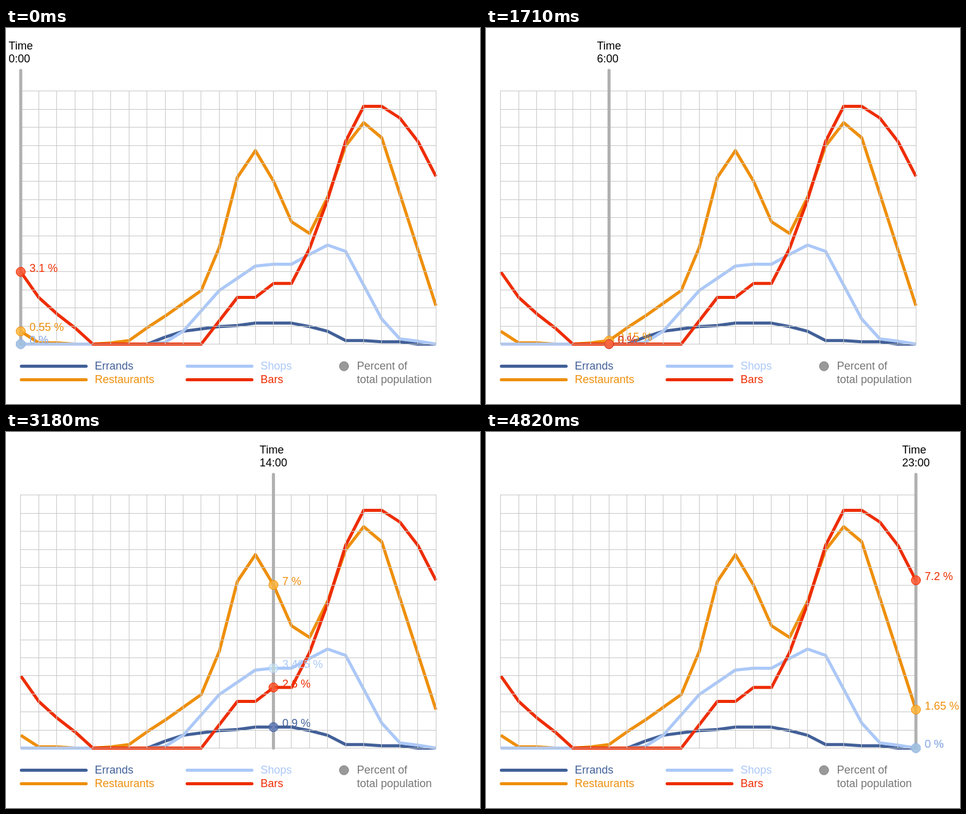
Recreate the animation shown at these times as an HTML page with a canvas. Size 772x612 px, loop 5.43 s.

```html
<!DOCTYPE html>
<html lang="en">
<head>
<meta charset="utf-8">
<title>Activity by hour</title>
<style>
html, body { margin: 0; height: 100%; overflow: hidden; background: #fff; }
canvas { display: block; }
</style>
</head>
<body>
<canvas id="stage" width="772" height="612"></canvas>
<script>
const ctx = document.getElementById('stage').getContext('2d');
const LOOP = 5430, LEFT = 24, STEP = 29.4, BASE = 514.5, UNIT = 37.94;
const GRID = '#c8c8c8';

// Each key is [hour, percent, bend]; the hours between follow t^bend (1 = straight).
// Values are rounded to the given precision.
const series = [
  { name: 'Errands', color: '#426098', fill: '#5a74b4', alpha: .8, legend: [25, 550.5], precision: .05,
    keys: [[7, 0], [9, .55], [13, .9], [15, .9], [17, .55], [18, .15], [21, .1], [22, 0]] },
  { name: 'Restaurants', color: '#ee8f0c', fill: '#ffb02c', alpha: .8, legend: [25, 572.5], precision: .05,
    keys: [[0, .55], [1, .05], [4, 0], [6, .15], [10, 2.3], [12, 7.15, 1.4], [13, 8.3], [14, 7],
      [16, 4.75, .36], [18, 8.5, 1.27], [19, 9.5], [20, 8.85], [23, 1.65]] },
  { name: 'Shops', color: '#abc8f8', fill: '#cdf0fc', alpha: .55, legend: [295, 550.5], precision: .025,
    keys: [[7, 0], [9, .55, 2.9], [11, 2.3], [13, 3.35], [14, 3.425], [15, 3.425], [17, 4.25],
      [18, 3.975], [20, 1.075], [21, .225], [23, 0]] },
  { name: 'Bars', color: '#ee2d00', fill: '#ff4b20', alpha: .8, legend: [295, 572.5], precision: .1,
    keys: [[0, 3.1], [1, 2], [4, 0], [10, 0], [12, 2], [13, 2], [14, 2.6], [15, 2.6],
      [18, 8.7, 1.3], [19, 10.2], [20, 10.2], [23, 7.2, 1.67]] }
];

function valueAt({ keys, precision }, hour) {
  const next = keys.findIndex(key => key[0] >= hour);
  if (next < 0) return keys[keys.length - 1][1];
  const [h1, v1, bend = 1] = keys[next];
  if (next === 0 || h1 === hour) return v1;
  const [h0, v0] = keys[next - 1];
  const value = v0 + (v1 - v0) * ((hour - h0) / (h1 - h0)) ** bend;
  return +(Math.round(value / precision) * precision).toFixed(3);
}

// Milliseconds from one hour to the next: quick at first, then a repeating rhythm
function gapBefore(hour) {
  if (hour === 1) return 910;
  if (hour < 12) return 157;
  if (hour < 14) return 230;
  return [170, 150, 230][hour % 3];
}

function hourAt(time) {
  let hour = 0;
  for (let start = 0; hour < 23; hour++) {
    start += gapBefore(hour + 1);
    if (start > time) break;
  }
  return hour;
}

const px = hour => LEFT + STEP * hour;
const py = value => BASE - UNIT * value;

function line(points, color, width, cap = 'butt') {
  ctx.beginPath();
  points.forEach(([x, y]) => ctx.lineTo(x, y));
  ctx.strokeStyle = color;
  ctx.lineWidth = width;
  ctx.lineCap = cap;
  ctx.stroke();
}

function dot(x, y, fill, edge, alpha = 1) {
  ctx.beginPath();
  ctx.arc(x, y, 7.5, 0, Math.PI * 2);
  ctx.globalAlpha = alpha;
  ctx.fillStyle = fill;
  ctx.fill();
  ctx.globalAlpha = 1;
  ctx.strokeStyle = edge;
  ctx.lineWidth = 1;
  ctx.stroke();
}

function text(str, x, y, color) {
  ctx.fillStyle = color;
  ctx.fillText(str, x, y);
}

function drawGrid() {
  for (let i = 0; i < 24; i++) {
    const x = Math.floor(23.85 + STEP * i) + .5;
    line([[x, 102], [x, 515]], GRID, 1);
  }
  for (let i = 0; i < 15; i++) {
    const y = Math.floor(102.9 + STEP * i) + .5;
    line([[23, y], [701, y]], GRID, 1);
  }
}

function drawLegend() {
  for (const { name, color, legend: [x, y] } of series) {
    line([[x, y], [x + 105.5, y]], color, 5, 'round');
    text(name, x + 119.5, y + 5.9, color);
  }
  dot(550.5, 550.5, '#999', '#808080');
  text('Percent of', 571.5, 556.4, '#757575');
  text('total population', 571.5, 577.5, '#757575');
}

function drawMarker(hour) {
  const x = px(hour), clock = hour + ':00';
  line([[x, 69], [x, BASE]], '#b0b0b0', 5, 'round');
  for (const s of series) {
    const value = valueAt(s, hour), y = py(value);
    dot(x, y, s.fill, s.color, s.alpha);
    text(value + ' %', x + 14.3, y - .3, s.color);
  }
  const width = Math.max(ctx.measureText('Time').width, ctx.measureText(clock).width);
  text('Time', x - width / 2, 35.4, '#000');
  text(clock, x - width / 2, 56.4, '#000');
}

function draw(hour) {
  ctx.fillStyle = '#fff';
  ctx.fillRect(0, 0, 772, 612);
  ctx.font = '18px "Liberation Sans", Arial, sans-serif';
  ctx.lineJoin = 'round';
  for (const s of series) {
    line(Array.from({ length: 24 }, (_, h) => [px(h), py(valueAt(s, h))]), s.color, 5);
  }
  drawGrid();
  drawLegend();
  drawMarker(hour);
}

function tick() {
  draw(hourAt(performance.now() % LOOP));
  requestAnimationFrame(tick);
}
tick();
</script>
</body>
</html>
```
